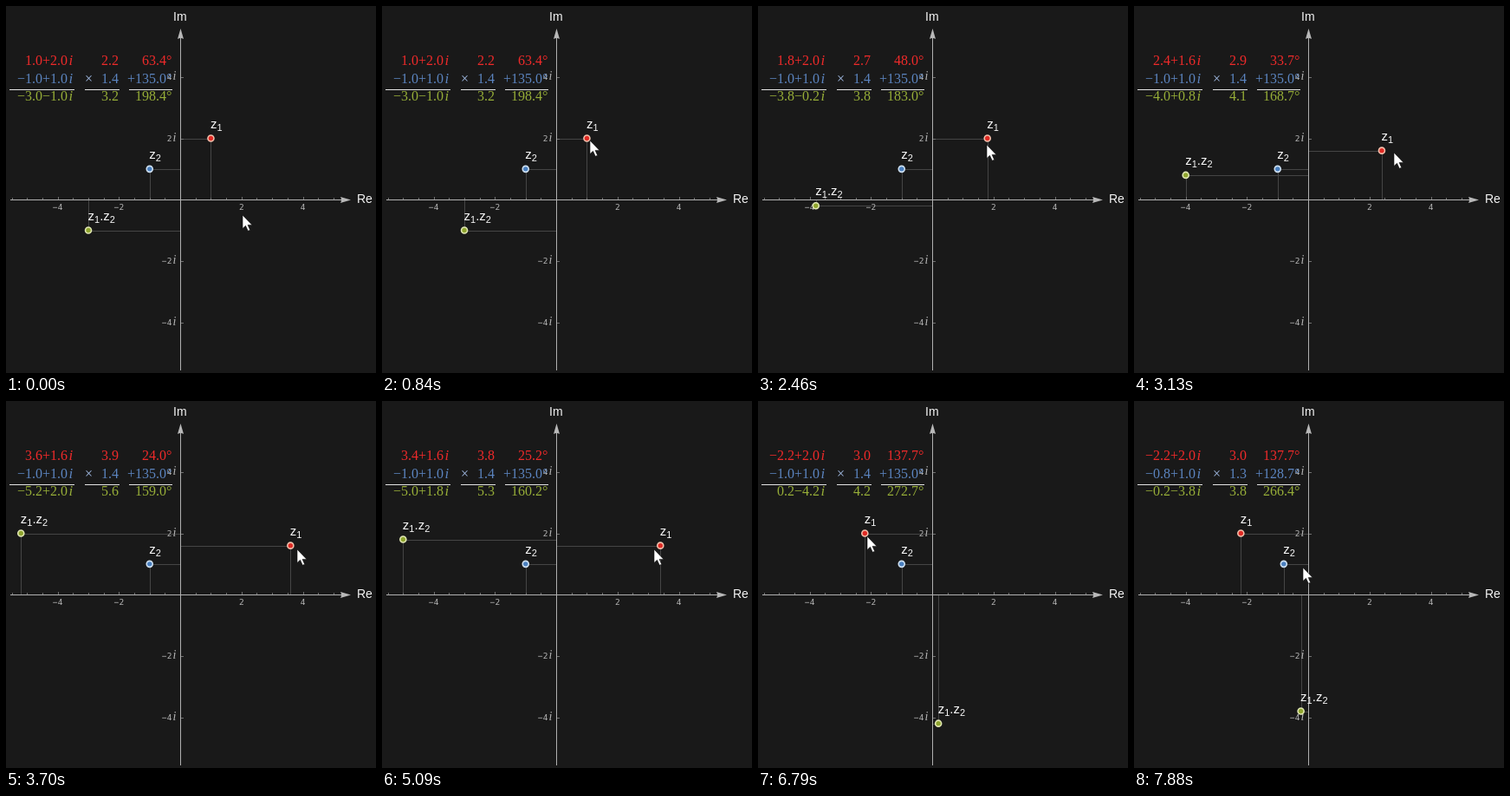
Write an HTML page that moves like this. It is 427 px wide and 423 px high and loops after 8000 ms.

```html
<!DOCTYPE html>
<html lang="en">
<head>
<meta charset="utf-8">
<title>Complex multiplication</title>
<style>
  html, body { margin: 0; width: 100%; height: 100%; overflow: hidden; background: #191919; }
  svg { display: block; width: 427px; height: 423px; }
  text { white-space: pre; }
  .label { font: 15px "Liberation Sans", Arial, sans-serif; fill: #f8f8f8; }
  .sub { font-size: 11px; }
  .axis { font: 14px "Liberation Sans", Arial, sans-serif; fill: #f4f4f4; }
  .tick { font: 9.5px "DejaVu Sans Mono", monospace; fill: #b4b4b4; }
  .num { font: 16px "Liberation Serif", Times, serif; text-anchor: end; }
  .unit { font: italic 17px "Liberation Serif", Times, serif; }
  .tick-unit { font: italic 14px "Liberation Serif", Times, serif; fill: #b4b4b4; }
  .line { stroke: #b0b0b0; shape-rendering: crispEdges; }
  .minor { stroke: #707070; shape-rendering: crispEdges; }
  .guide { stroke: #454545; shape-rendering: crispEdges; }
  .rule { stroke: #e4e4e4; shape-rendering: crispEdges; }
</style>
</head>
<body>
<svg id="stage" viewBox="0 0 427 423"></svg>
<script>
const LOOP = 8000, UNIT = 35.35, OX = 201.1, OY = 223.2;
const stage = document.getElementById("stage");

function add(tag, attrs, text) {
  const el = document.createElementNS("http://www.w3.org/2000/svg", tag);
  set(el, attrs);
  if (text) el.textContent = text;
  return stage.appendChild(el);
}
function set(el, attrs) {
  for (const key in attrs) el.setAttribute(key, attrs[key]);
}
const line = (cls, x1, y1, x2, y2) => add("line", { class: cls, x1, y1, x2, y2 });
const px = x => OX + x * UNIT;
const py = y => OY - y * UNIT;
const crisp = v => Math.round(v) + 0.5;

// Points: guides first, so the axes lie over them
const points = [
  { color: "#e02a24", ring: "#f3c0ac", names: "1" },
  { color: "#4a80c0", ring: "#cfe0f0", names: "2" },
  { color: "#8fa52e", ring: "#e2e8b4", names: "12" }
];
for (const p of points) {
  p.down = line("guide", 0, 0, 0, 0);
  p.across = line("guide", 0, 0, 0, 0);
}

// Axes and ticks
line("line", 5, 223.5, 388, 223.5);
line("line", 201.5, 37, 201.5, 420);
add("path", { d: "M398 223.5L386 220Q388 223.5 386 227Z", fill: "#b8b8b8" });
add("path", { d: "M201.5 26L198 38Q201.5 36 205 38Z", fill: "#b8b8b8" });
for (let k = -11; k <= 10; k++) {
  if (!k) continue;
  const x = crisp(px(k / 2));
  line("minor", x, k % 4 ? 221 : 220, x, 223);
}
const minus = s => String(s).replace(/-/g, "\u2212");
for (const v of [-4, -2, 2, 4]) {
  add("text", { class: "tick", x: px(v), y: 235, "text-anchor": "middle" }, minus(v));
  const y = crisp(py(v));
  line("minor", 202, y, 205, y);
  add("text", { class: "tick", x: 191.5, y: y + 2.5, "text-anchor": "end" }, minus(v));
  add("text", { class: "tick-unit", x: 192.5, y: y + 2.5 }, "i");
}
add("text", { class: "axis", x: 193, y: 17 }, "Im");
add("text", { class: "axis", x: 405, y: 227 }, "Re");

// Number panel
const colors = ["#ee2a2a", "#5b84bf", "#96ad38"];
const rows = colors.map((fill, i) => {
  const y = [68, 89, 109][i];
  add("text", { class: "unit", x: 72.5, y, fill }, "i");
  return [71, 130, 191.5].map(x => add("text", { class: "num", x, y, fill }));
});
add("text", { class: "num", x: 100, y: 89, fill: "#a4bee8", "font-weight": "bold" }, "\u00d7");
line("rule", 4, 96.5, 79, 96.5);
line("rule", 91, 96.5, 131, 96.5);
line("rule", 142, 96.5, 192, 96.5);

// Dots and labels
const sub = n => `z<tspan class="sub" dy="3">${n}</tspan>`;
for (const p of points) {
  p.dot = add("circle", { r: 3.5, fill: p.color, stroke: p.ring, "stroke-width": 1.6 });
  p.label = add("text", { class: "label" });
  p.label.innerHTML = [...p.names].map(sub).join('<tspan dy="-3">.</tspan>');
}
const cursor = add("path", {
  d: "M1 1V16.5L4.5 13.3L7.3 19.3L9.7 18.2L7.1 12.4H12Z",
  fill: "#fff", stroke: "#0c0c0c", "stroke-width": 0.6
});

// Stepped moves: start, end, steps, cursor x and y, then z1 and z2 if they change
const first = { cx: 272, cy: 240, x: 1, y: 2, x2: -1 };
const moves = [
  [120, 840, 6, 239, 154],
  [1560, 1950, 4, 247, 155, 1.2, 2],
  [2080, 2730, 6, 278, 162, 2.2, 1.8],
  [3130, 3130, 1, 299, 168, 2.4, 1.6],
  [3270, 3700, 4, 335, 170, 3.6, 1.6],
  [4820, 5090, 3, 313, 170, 3.4, 1.6],
  [5230, 5810, 5, 183, 154, 0.4, 1.8],
  [5960, 6790, 7, 125, 155, -2.2, 2],
  [6930, 6930, 1, 123, 155],
  [7210, 7480, 3, 172, 190],
  [7880, 7880, 1, 194, 191, -2.2, 2, -0.8]
];

function poseAt(t) {
  let pose = first;
  for (const [start, end, steps, cx, cy, x = pose.x, y = pose.y, x2 = pose.x2] of moves) {
    if (t < start) break;
    const gap = (end - start) / (steps - 1) || 1;
    const done = Math.min(steps, Math.floor((t - start) / gap + 0.02) + 1);
    const goal = { cx, cy, x, y, x2 }, next = {};
    for (const key in goal) next[key] = pose[key] + (goal[key] - pose[key]) * done / steps;
    pose = next;
  }
  return pose;
}

const snap = v => Math.round(v * 5) / 5;
const fixed = v => minus(v.toFixed(1));
const degrees = (x, y) => (Math.atan2(y, x) * 180 / Math.PI + 360) % 360;

function place(p, x, y) {
  const cx = px(x), cy = py(y);
  set(p.dot, { cx, cy });
  set(p.label, { x: cx - 0.5, y: cy - 12 });
  set(p.down, { x1: crisp(cx), x2: crisp(cx), y1: cy, y2: OY });
  set(p.across, { x1: cx, x2: OX, y1: crisp(cy), y2: crisp(cy) });
}

function draw() {
  const pose = poseAt(performance.now() % LOOP);
  const a = snap(pose.x), b = snap(pose.y), c = pose.x2, d = 1;
  const values = [[a, b], [c, d], [a * c - b * d, a * d + b * c]];
  const angles = [degrees(a, b), degrees(c, d)];
  angles.push((angles[0] + angles[1]) % 360);
  values.forEach(([x, y], i) => {
    place(points[i], x, y);
    rows[i][0].textContent = fixed(x) + (y < 0 ? "" : "+") + fixed(y);
    rows[i][1].textContent = fixed(Math.hypot(x, y));
    rows[i][2].textContent = (i === 1 ? "+" : "") + fixed(angles[i]) + "\u00b0";
  });
  set(cursor, { transform: `translate(${Math.round(pose.cx)} ${Math.round(pose.cy)})` });
  requestAnimationFrame(draw);
}
draw();
</script>
</body>
</html>
```
